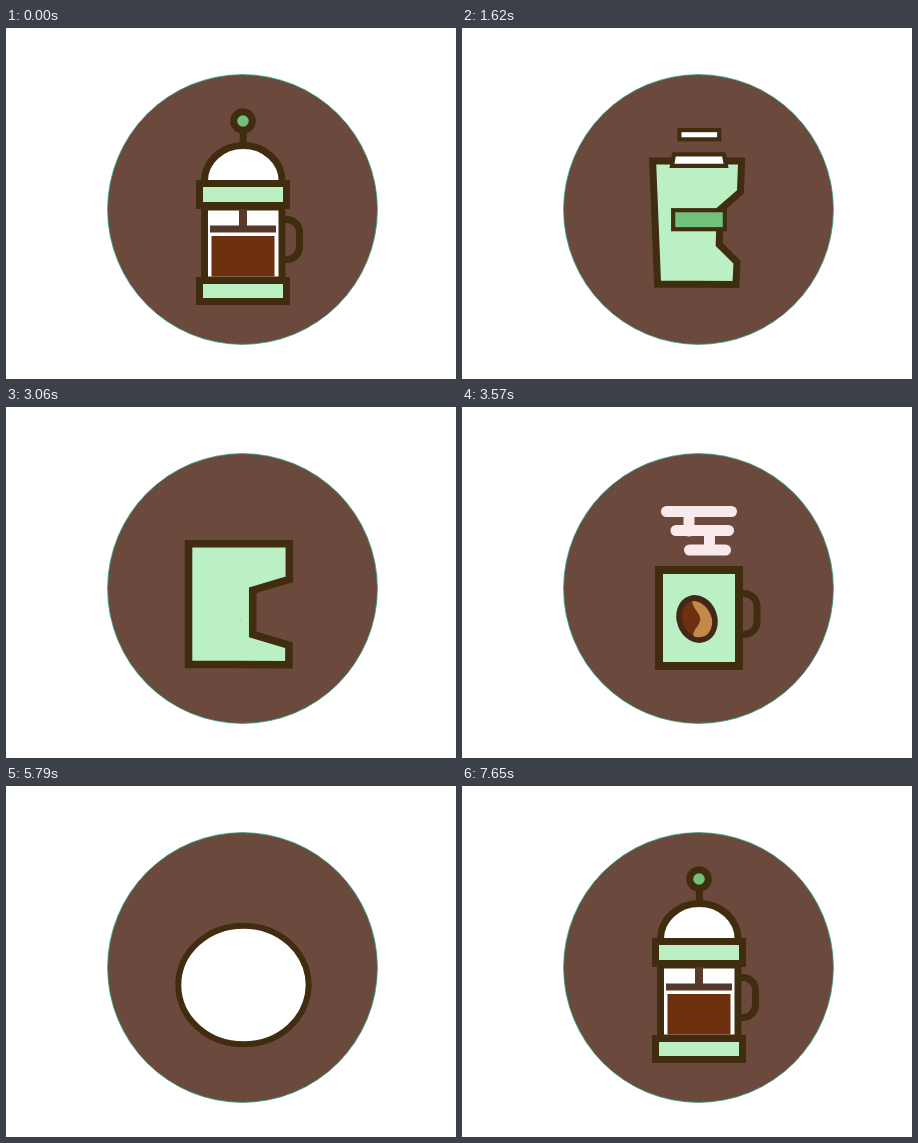
Write an HTML page that moves like this. It is 450 px wide and 351 px high and loops after 7680 ms.

```html
<!DOCTYPE html>
<html lang="en">
<head>
<meta charset="utf-8">
<title>Coffee icons</title>
<style>
  html, body { margin: 0; width: 100%; height: 100%; overflow: hidden; background: #fff; }
  svg { display: block; width: 100%; height: 100%; }
</style>
</head>
<body>
<svg id="stage" viewBox="0 0 450 351">
  <circle cx="236.5" cy="181.5" r="134.9" fill="#6c493d" stroke="#2ba583" stroke-width=".8"/>
  <path id="body" stroke="#402c0f" stroke-miterlimit="8"/>
  <g id="parts" stroke="#402c0f" stroke-width="7" fill="none"></g>
</svg>
<script>
const LOOP = 7680;
const MINT = '#bbf0c5', GREEN = '#71c07c', WHITE = '#ffffff';
const COFFEE = '#6c300f', CREMA = '#b8622a', INK = '#402c0f';
const $ = id => document.getElementById(id);
const clamp = v => Math.max(0, Math.min(1, v));
const mix = (a, b, k) => a + (b - a) * k;
const wrap = t => ((t % LOOP) + LOOP) % LOOP;
const inOut = k => k * k * (3 - 2 * k);
const outBack = k => 1 + 2.4 * (k - 1) ** 3 + 1.4 * (k - 1) ** 2;

// Every body is eight cubic edges, so any two can be blended.
function poly(points) {
  return points.flatMap((p, i) => {
    const q = points[(i + 1) % points.length];
    return [1 / 3, 2 / 3, 1].map(k => [mix(p[0], q[0], k), mix(p[1], q[1], k)]);
  });
}

function quad(l, r, top, bottom, l2 = l, r2 = r) {
  const right = [0, .2, .4, .6, .8, 1].map(k => [mix(r, r2, k), mix(top, bottom, k)]);
  return poly([[l, top], ...right, [l2, bottom]]);
}

function oval(cx, cy, rx, ry) {
  const angles = [-135, -45, -27, -9, 9, 27, 45, 135, 225].map(a => a * Math.PI / 180);
  const out = [];
  for (let i = 0; i < 8; i++) {
    const a = angles[i], b = angles[i + 1], h = 4 / 3 * Math.tan((b - a) / 4);
    const at = (c, k) => [cx + rx * (Math.cos(c) - k * Math.sin(c)), cy + ry * (Math.sin(c) + k * Math.cos(c))];
    out.push(at(a, h), at(b, -h), at(b, 0));
  }
  return out;
}

const bodies = [
  { t: 420, d: 360, fill: MINT, w: 7, shape: quad(198.5, 276, 142, 256.5, 205, 269) },
  { t: 1500, d: 390, fill: MINT, w: 7, shape: poly([[164, 103], [291.5, 103], [291.5, 160], [208, 160],
      [208, 236], [290.5, 236], [290.5, 256], [164, 255.5]]) },
  { t: 2850, d: 390, fill: MINT, w: 8, shape: quad(197, 277, 163, 259) },
  { t: 4140, d: 390, fill: MINT, w: 7, shape: oval(236.5, 182, 71.5, 71.5) },
  { t: 5550, d: 240, fill: WHITE, w: 6, shape: oval(237.5, 199, 65.2, 59.3) },
  { t: 5790, d: 300, fill: WHITE, w: 7, shape: oval(237, 210, 55, 48) },
  { t: 6870, d: 390, fill: WHITE, w: 7, shape: quad(198.5, 276, 179, 252) }
];

const rect = (x, y, w, h, fill, more = '') =>
  `<rect x="${x}" y="${y}" width="${w}" height="${h}" fill="${fill}" ${more}/>`;
const flat = (x, y, w, h, fill) => rect(x, y, w, h, fill, 'stroke="none"');
const path = (d, fill = 'none', more = '') => `<path d="${d}" fill="${fill}" ${more}/>`;
const circle = (x, y, r, fill, more = '') => `<circle cx="${x}" cy="${y}" r="${r}" fill="${fill}" ${more}/>`;

const parts = [];
function scene(start, end, list) {
  for (const [delay, ox, oy, markup, dx = 0, dy = 0] of list) {
    const el = document.createElementNS('http://www.w3.org/2000/svg', 'g');
    el.innerHTML = markup;
    $('parts').append(el);
    parts.push({ el, start: start + delay, life: wrap(end - start - delay), ox, oy, dx, dy });
  }
}

// French press
scene(6870, 420, [
  [300, 237, 248, flat(205.5, 208, 63, 40.5, COFFEE).replace('<rect', '<rect id="brew"')],
  [330, 237, 180, `<g id="plunger">${flat(233, 170, 8, 29, '#59392b')}${flat(204, 197.5, 66, 7, '#54382b')}</g>`],
  [270, 277, 211, path('M277 191.5h4a12.5 12.5 0 0 1 12.5 12.5v15a12.5 12.5 0 0 1-12.5 12.5h-4')],
  [360, 237, 120, `<g id="knob">${path('M237.3 102V124')}${circle(237, 93, 9.3, GREEN)}</g>`, 0, 20],
  [210, 237, 156, path('M198.5 156v-3a38.8 35.5 0 0 1 77.6 0v3', WHITE)],
  [150, 237, 167, rect(193.5, 155.5, 87, 22, MINT)],
  [120, 237, 263, rect(193.5, 252.5, 87, 21, MINT)]
]);

// Takeaway cup
scene(420, 1500, [
  [90, 237, 192, rect(193.5, 175.5, 87, 32, GREEN)],
  [60, 237, 132, path('M195 122.5H279L282.5 142H191.5Z', WHITE)],
  [120, 237, 95, `<g id="lid">${rect(204, 87, 67, 15.5, WHITE)}</g>`]
]);

// Espresso machine
scene(1500, 2850, [
  [270, 212, 132, flat(204.5, 106.5, 16, 50, GREEN)],
  [270, 212, 246, flat(204.5, 239.5, 16, 13, GREEN)],
  ...[231, 248, 265].map((x, i) => [270 + i * 30, x + 5, 113, flat(x, 113, 11, 38, GREEN)]),
  [300, 265, 173, path('M266 173H336.5', 'none', 'stroke-width="9" stroke-linecap="round"')],
  [240, 249, 161, path('M230 162.5H268L264 172 268 182.5H230L234 172Z', GREEN, 'stroke-linejoin="round"')],
  [330, 249, 236, path('M266 206h4.500a5 5 0 0 1 5 5v2.500a5 5 0 0 1-5 5h-4.500') + rect(235, 195.500, 30, 36.500, WHITE)]
]);

// Mug
scene(2850, 4140, [
  [240, 279, 207, path('M278 186.5h4a13 13 0 0 1 13 13v15a13 13 0 0 1-13 13h-4')],
  [210, 235, 212, `<ellipse cx="235" cy="212" rx="17.5" ry="21.500" transform="rotate(-20 235 212)" fill="${COFFEE}" stroke="none"/>`
    + path('M230 194C232 206 244 208 235 220C230 226 231 229 233 231C248 233 253 218 249 209C245 198 237 194 230 194Z', '#c18a4a', 'stroke="none"')
    + `<ellipse cx="235" cy="212" rx="17.5" ry="21.500" transform="rotate(-20 235 212)" stroke="#432719" stroke-width="5.5"/>`],
  ...['M227.500 143H263.5M247.500 143V124', 'M214 123.500H266.500M227 124V105', 'M204.500 104.500H269.500'].map((d, i) =>
    [240 + i * 50, 237, 143 - i * 19, path(d, 'none', 'stroke="#f8eaeb" stroke-width="11" stroke-linecap="round"'), 0, 12])
]);

// Cup and saucer from above
scene(4140, 5550, [
  [210, 237, 181.5, path('M272 181.5H286', 'none', 'stroke-width="21" stroke-linecap="round"')
    + circle(237, 181.500, 43, INK, 'stroke="none"')
    + circle(237, 181.500, 36, WHITE, 'stroke="none"')
    + path('M268 181.500H288', 'none', 'stroke="#fff" stroke-width="5"')
    + circle(236.500, 181.500, 31.500, CREMA, 'stroke="none"')],
  [270, 237, 181.5, path('M250 153C236 167 252 176 242 187C235 194 216 190 217 206A31.500 31.500 0 1 0 250 153Z', COFFEE, 'stroke="none"')]
]);

// Glass carafe
scene(5550, 6870, [
  [420, 237, 250, path('M190 214H284A47 36 0 0 1 190 214Z', COFFEE, 'stroke="none"')],
  [390, 266, 154, path('M266 153.500H298a11 11 0 0 1 11 11V202', 'none', 'stroke-linecap="round"')],
  [300, 237, 164, rect(207.500, 142.500, 59, 22, MINT)],
  [540, 237, 142, circle(237, 132, 8, GREEN), 0, -20]
]);

function blend(a, b, k) {
  const rgb = c => [1, 3, 5].map(i => parseInt(c.slice(i, i + 2), 16));
  const to = rgb(b);
  return `rgb(${rgb(a).map((v, i) => Math.round(mix(v, to[i], k)))})`;
}

function drawBody(t) {
  const n = bodies.length;
  let i = bodies.findLastIndex(b => b.t <= t);
  if (i < 0) i = n - 1;
  const to = bodies[i], from = bodies[(i + n - 1) % n];
  const k = inOut(clamp(wrap(t - to.t) / to.d));
  const p = to.shape.map((q, j) => q.map((v, c) => mix(from.shape[j][c], v, k).toFixed(2)).join(' '));
  let d = 'M' + p[23];
  for (let j = 0; j < 24; j += 3) d += `C${p[j]} ${p[j + 1]} ${p[j + 2]}`;
  $('body').setAttribute('d', d + 'Z');
  $('body').setAttribute('fill', blend(from.fill, to.fill, k));
  $('body').setAttribute('stroke-width', mix(from.w, to.w, k));
}

function drawPart(p, t) {
  const age = wrap(t - p.start);
  const away = 1 - outBack(clamp(age / 330));
  const size = age < p.life ? 1 - away : 1 - clamp((age - p.life) / 190) ** 2;
  p.el.style.display = size > .01 ? '' : 'none';
  p.el.setAttribute('transform',
    `translate(${p.ox + p.dx * away} ${p.oy + p.dy * away}) scale(${size}) translate(${-p.ox} ${-p.oy})`);
}

function draw(t) {
  drawBody(t);
  parts.forEach(p => drawPart(p, t));
  const fall = 20 * outBack(clamp((t - 870) / 270));
  $('lid').setAttribute('transform', `translate(0 ${t < 870 ? 0 : fall})`);
  const press = t < 6000 ? 5 * inOut(clamp(t / 240)) : 0;
  for (const id of ['knob', 'plunger']) $(id).setAttribute('transform', `translate(0 ${press})`);
  $('brew').setAttribute('y', 208 + press);
  $('brew').setAttribute('height', 40.5 - press);
}

const begin = performance.now();
function tick() {
  draw((performance.now() - begin) % LOOP);
  requestAnimationFrame(tick);
}
tick();
</script>
</body>
</html>
```
